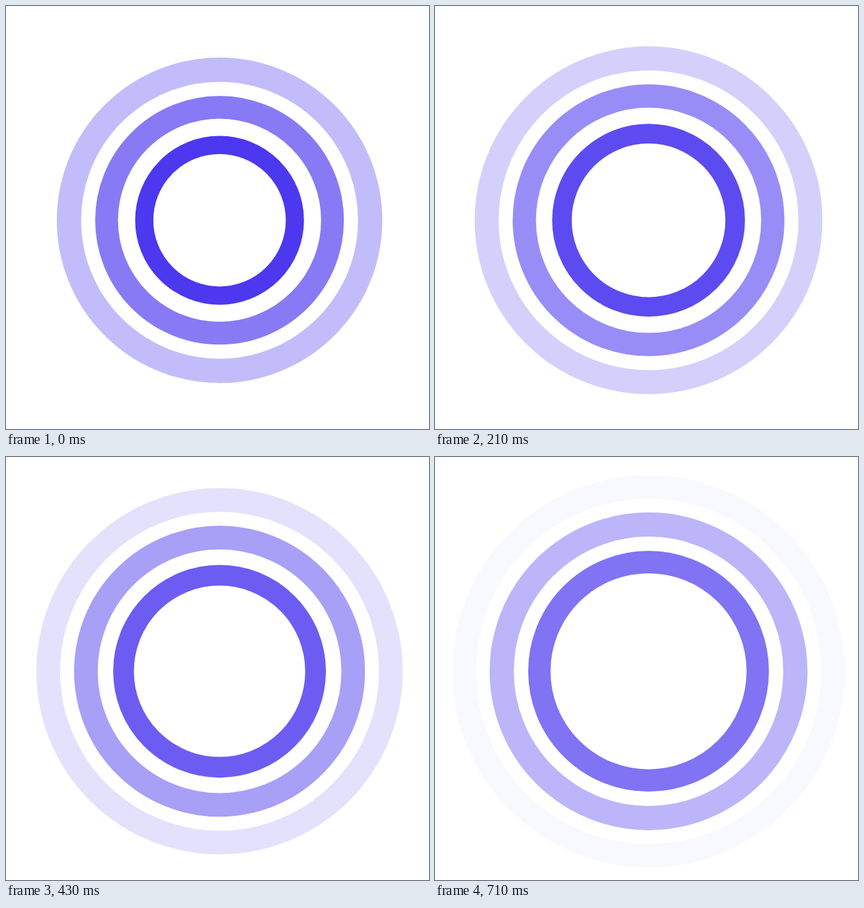
These frames come from a looping animation (640 by 640 pixels, 780 ms). An HTML page:

```html
<!DOCTYPE html>
<html lang="en">
<head>
<meta charset="utf-8">
<title>Pulse rings</title>
<style>
  html, body { margin: 0; width: 100%; height: 100%; overflow: hidden; background: #fff; }
  svg { display: block; width: 100vw; height: 100vh; }
  circle { fill: none; stroke: #4b38ef; }
</style>
</head>
<body>
<svg viewBox="0 0 640 640">
  <g transform="translate(323.1 324.2)">
    <circle/><circle/><circle/>
  </g>
</svg>
<script>
  const LOOP = 780;
  const STARTS = [0, 70, 140, 210, 290, 360, 430, 500, 570, 640, 710];
  const TICK = 40;    // ms per motion tick
  const CYCLE = 20;   // ticks for a ring to reach the next ring's place
  const WIDTHS = [27.5, 34.5, 36.8, 35.2];
  const rings = document.querySelectorAll('circle');

  const lerp = (a, b, p) => a + (b - a) * p;

  function draw(time) {
    const t = time % LOOP;
    const start = STARTS.findLast(s => s <= t);
    const p = Math.ceil(start / TICK) / CYCLE;
    rings.forEach((ring, i) => {
      const stage = i + p;
      ring.setAttribute('r', 113.95 + 56.95 * stage);
      ring.setAttribute('stroke-width', lerp(WIDTHS[i], WIDTHS[i + 1], p));
      ring.setAttribute('stroke-opacity', 1 - stage / 3);
    });
  }

  function loop() {
    draw(performance.now());
    requestAnimationFrame(loop);
  }

  draw(0);
  requestAnimationFrame(loop);
</script>
</body>
</html>
```
